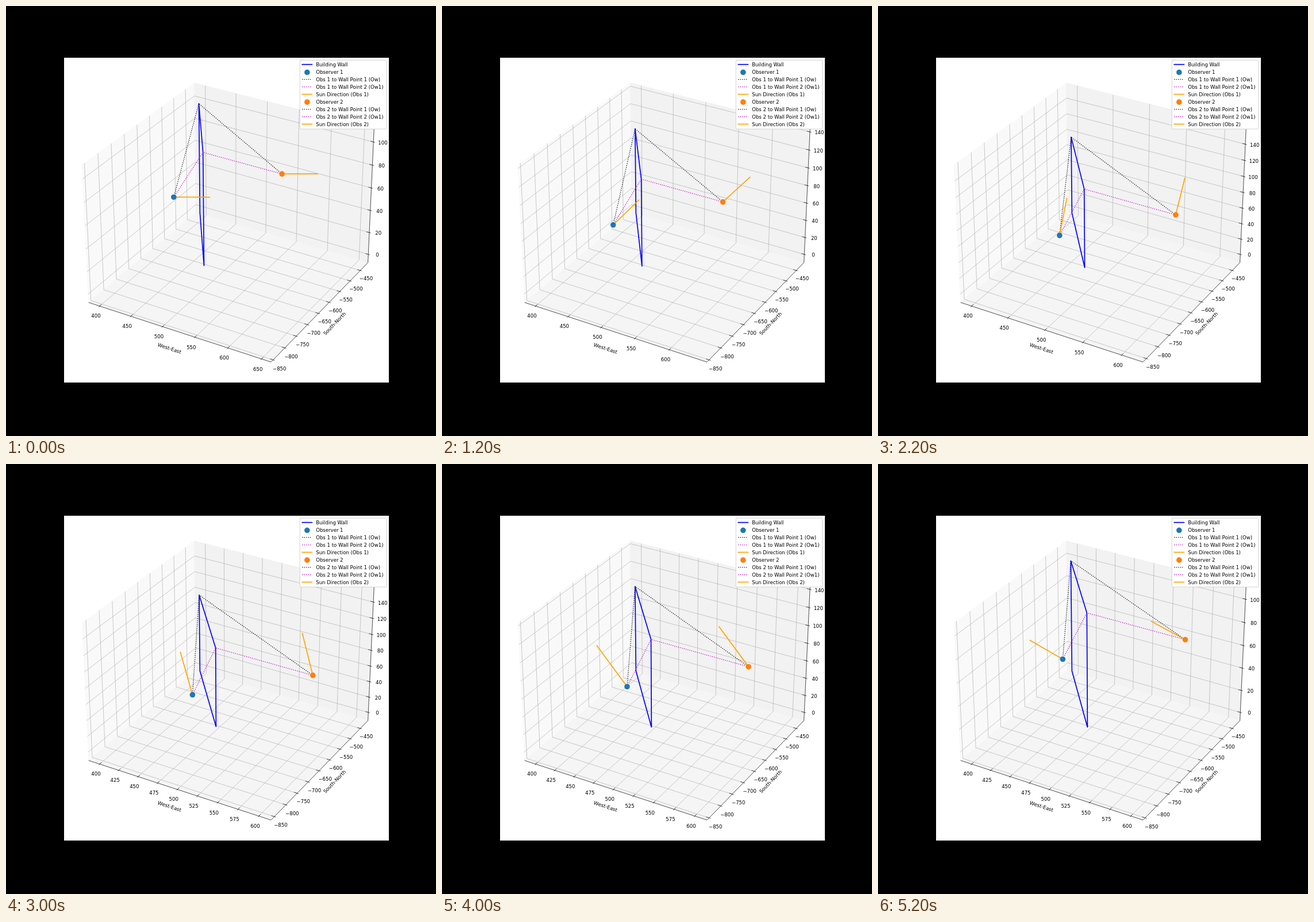
These frames come from a looping animation (748 by 748 pixels, 5.3 s). An HTML page with a canvas:

```html
<!DOCTYPE html>
<html>
<head>
<meta charset="utf-8">
<style>
html, body { margin: 0; width: 100%; height: 100%; overflow: hidden; background: #000; }
canvas { display: block; }
</style>
</head>
<body>
<canvas id="stage" width="748" height="748"></canvas>
<script>
const ctx = document.getElementById('stage').getContext('2d');
const PT = 0.855;               // pixels per point
const EM = 10 * PT;
const STEPS = 53, STEP_MS = 100;
const BLUE = '#1f77b4', ORANGE = '#ff7f0e', SUN = '#ffa500', PURPLE = '#bf00bf', GRID = '#b0b0b0';

// Axes box in view units, and its slightly larger frame
const SIZE = [8 / 7, 8 / 7, 6 / 7];
const EDGE = SIZE.map(s => s / 2 * 25 / 24);
const rad = d => d * Math.PI / 180;

// Camera: azimuth -60, elevation 30, distance 10
function project([x, y, z]) {
  const c = Math.sqrt(3) / 2;
  const right = c * x + y / 2;
  const up = -x / 4 + c / 2 * y + c * z;
  const depth = c / 2 * x - 0.75 * y + z / 2;
  const k = 305.4 / (1 - depth / 10);
  return [391.1 + right * k, 364.9 - up * k];
}

// Scene in metres: east, north, height
const WALL_A = [400, -440], WALL_B = [480, -635];
const OBS = [[510, -830.5, 100], [600, -635, 100]];

// Sun vector every quarter of an hour
function sunVector(step) {
  const lat = rad(28.6), dec = rad(21.9), hour = rad(3.75 * step - 97);
  const { sin, cos } = Math;
  return [
    -cos(dec) * sin(hour),
    cos(lat) * sin(dec) - sin(lat) * cos(dec) * cos(hour),
    sin(lat) * sin(dec) + cos(lat) * cos(dec) * cos(hour)
  ].map(v => v * 50);
}

function path(points, color, width, dash = [], cap = 'butt') {
  ctx.beginPath();
  points.forEach(p => ctx.lineTo(p[0], p[1]));
  ctx.strokeStyle = color;
  ctx.lineWidth = width * PT;
  ctx.lineCap = cap;
  ctx.lineJoin = 'round';
  ctx.setLineDash(dash.map(d => d * width * PT));
  ctx.stroke();
}
const solid = (points, color) => path(points, color, 2, [], 'square');
const dotted = (points, color) => path(points, color, 1.5, [1, 1.65]);

function dot([x, y], color) {
  ctx.beginPath();
  ctx.arc(x, y, 4.8, 0, 7);
  ctx.fillStyle = color;
  ctx.fill();
}

function text(str, x, y, align = 'center', angle = 0, drop = 0.262) {
  ctx.save();
  ctx.translate(x, y);
  ctx.rotate(angle);
  ctx.font = EM + 'px "DejaVu Sans", sans-serif';
  ctx.textAlign = align;
  ctx.fillStyle = '#000';
  ctx.fillText(str, 0, drop * EM);
  ctx.restore();
}

function pane(points, color) {
  const p = points.map(project);
  path([...p, p[0]], color, 1);
  ctx.fillStyle = color;
  ctx.fill();
}

function ticksOf([lo, hi]) {
  const step = [10, 20, 25, 50, 100].find(s => s >= (hi - lo) / 9);
  const list = [];
  for (let v = Math.ceil(lo / step) * step; v <= hi; v += step) list.push(v);
  return list;
}

function drawAxes(limits, toBox) {
  const [X, Y, Z] = EDGE;
  pane([[-X, -Y, -Z], [-X, Y, -Z], [-X, Y, Z], [-X, -Y, Z]], '#f9f9f9');
  pane([[-X, Y, -Z], [X, Y, -Z], [X, Y, Z], [-X, Y, Z]], '#f2f2f2');
  pane([[-X, -Y, -Z], [X, -Y, -Z], [X, Y, -Z], [-X, Y, -Z]], '#f5f5f5');

  // home: sides the axis sits on; out: directions labels move; tick: tick direction
  const axes = [
    { home: [0, -1, -1], out: [0, -1, -1], tick: 1, grid: [[0, -1, -1], [0, 1, -1], [0, 1, 1]], name: 'West-East' },
    { home: [1, 0, -1], out: [1, 0, -1], tick: 0, grid: [[1, 0, -1], [-1, 0, -1], [-1, 0, 1]], name: 'South-North' },
    { home: [1, 1, 0], out: [1, 1, 0], tick: 0, grid: [[-1, -1, 0], [-1, 1, 0], [1, 1, 0]] }
  ];
  const at = (sides, i, v) => sides.map((s, j) => j === i ? v : s * EDGE[j]);
  const shifted = (p, out, amount) => p.map((v, j) => v + out[j] * SIZE[j] * amount);

  axes.forEach((a, i) => limits[i].ticks.forEach(t =>
    path(a.grid.map(s => project(at(s, i, toBox(t, i)))), GRID, 0.8)));

  axes.forEach((a, i) => {
    const ends = [-1, 1].map(s => project(at(a.home, i, s * EDGE[i])));
    path(ends, '#000', 0.8);
    if (a.name) {
      const [x, y] = project(shifted(at(a.home, i, 0), a.out, 0.0757));
      text(a.name, x, y, 'center', Math.atan2(ends[1][1] - ends[0][1], ends[1][0] - ends[0][0]));
    }
    for (const t of limits[i].ticks) {
      const p = at(a.home, i, toBox(t, i));
      const mark = [0.1, -0.2].map(f =>
        project(p.map((v, j) => j === a.tick ? v + a.home[j] * f * SIZE[j] / 12 : v)));
      path(mark, '#000', 0.8);
      const [x, y] = project(shifted(p, a.out, 0.0348));
      text(String(t).replace('-', '\u2212'), x, y, 'center', 0, 0.76);
    }
  });
}

function drawLegend() {
  ctx.beginPath();
  ctx.roundRect(511.3, 94.3, 150.4, 119.7, 1.7);
  ctx.fillStyle = '#fff';
  ctx.fill();
  ctx.setLineDash([]);
  ctx.strokeStyle = '#ccc';
  ctx.lineWidth = PT;
  ctx.stroke();

  const observer = (n, color) => [
    ['Observer ' + n, dot, color],
    [`Obs ${n} to Wall Point 1 (Ow)`, dotted, '#000'],
    [`Obs ${n} to Wall Point 2 (Ow1)`, dotted, PURPLE],
    [`Sun Direction (Obs ${n})`, solid, SUN]
  ];
  const rows = [['Building Wall', solid, '#00f'], ...observer(1, BLUE), ...observer(2, ORANGE)];
  rows.forEach(([label, mark, color], i) => {
    const y = 101.7 + i * 12.97;
    if (mark === dot) dot([523.8, y + 0.6], color);
    else mark([[515.2, y], [532.3, y]], color);
    text(label, 539.2, y, 'left', 0, 0.365);
  });
}

function draw(step) {
  const sun = sunVector(step);
  const tips = OBS.map(o => o.map((v, i) => v + sun[i]));
  const corner = (p, z) => [...p, z];
  const wall = [corner(WALL_A, 0), corner(WALL_B, 0), corner(WALL_B, 100), corner(WALL_A, 100), corner(WALL_A, 0)];

  // Limits follow the data with a 5% margin
  const limits = [0, 1, 2].map(i => {
    const values = [...wall, ...OBS, ...tips].map(p => p[i]);
    const lo = Math.min(...values), hi = Math.max(...values), m = (hi - lo) * 0.05;
    const range = [lo - m, hi + m];
    return { range, ticks: ticksOf(range) };
  });
  const toBox = (v, i) => {
    const [lo, hi] = limits[i].range;
    return ((v - lo) / (hi - lo) - 0.5) * SIZE[i];
  };
  const view = p => project(p.map(toBox));

  ctx.fillStyle = '#000';
  ctx.fillRect(0, 0, 748, 748);
  ctx.fillStyle = '#fff';
  ctx.fillRect(101, 90, 565, 565);
  drawAxes(limits, toBox);

  solid(wall.map(view), '#00f');
  OBS.forEach((o, i) => {
    dotted([o, wall[3]].map(view), '#000');
    dotted([o, wall[2]].map(view), PURPLE);
    solid([o, tips[i]].map(view), SUN);
  });
  OBS.forEach((o, i) => dot(view(o), [BLUE, ORANGE][i]));
  drawLegend();
}

const start = performance.now();
function tick() {
  draw(Math.floor((performance.now() - start) / STEP_MS) % STEPS);
  requestAnimationFrame(tick);
}
tick();
</script>
</body>
</html>
```
